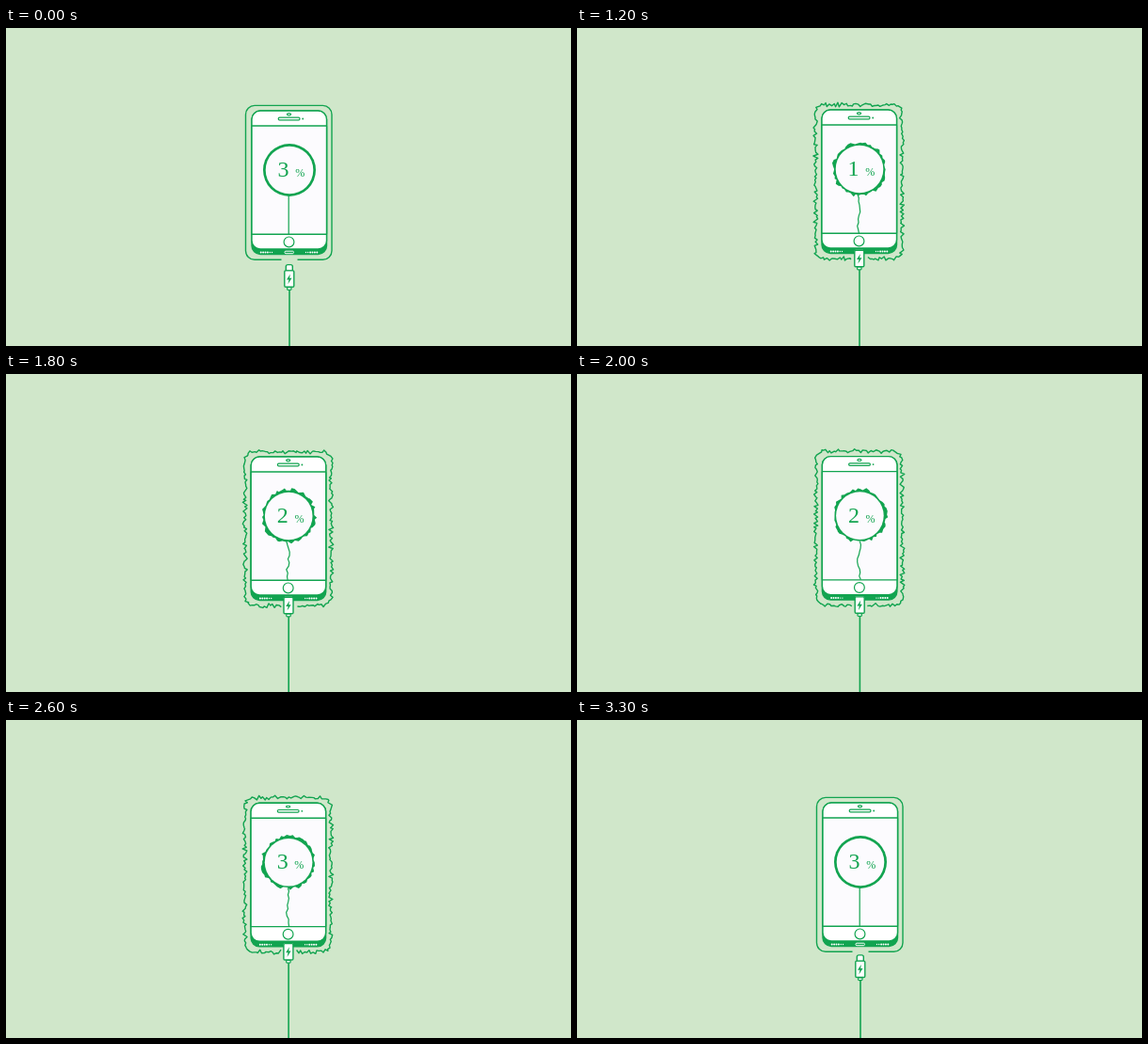
An HTML page for the animation above (3.4 s loop, 600x338 px).

```html
<!DOCTYPE html>
<html lang="en">
<head>
<meta charset="utf-8">
<title>Charging phone</title>
<style>
  html, body { margin: 0; width: 100%; height: 100%; overflow: hidden; background: #d0e7ca; }
  svg { display: block; width: 100vw; height: 100vh; }
  text { font-family: "Liberation Serif", "Times New Roman", serif; fill: #12a450; }
  .line { stroke: #12a450; stroke-width: 1.4; stroke-linejoin: round; }
  .ink { fill: #12a450; }
  .white { fill: #fff; }
  .screen { fill: #fcfbfe; }
</style>
</head>
<body>
<svg viewBox="0 0 600 338">
  <defs>
    <clipPath id="belowPort"><rect x="280" y="239.5" width="40" height="60"/></clipPath>
  </defs>
  <g id="stage">
    <path id="casing" class="line" fill="none" stroke-width="1.5"
      d="M309.5 246.3H336.5A9.5 9.5 0 0 0 346 236.8V91.9A9.5 9.5 0 0 0 336.5 82.4H264A9.5 9.5 0 0 0 254.5 91.9V236.8A9.5 9.5 0 0 0 264 246.3H292.5"/>

    <rect class="line ink" x="261" y="88" width="79.5" height="152.5" rx="9"/>
    <rect class="line white" x="261" y="88" width="79.5" height="147" rx="9"/>
    <rect class="line screen" x="261" y="104" width="79.5" height="115.3" stroke-width="1.2"/>
    <ellipse class="line white" cx="300.5" cy="91.8" rx="2.1" ry="1.1" style="stroke-width:1.2"/>
    <rect class="line white" x="289.2" y="95.2" width="22.8" height="2.6" rx="1.3" style="stroke-width:1.2"/>
    <circle class="ink" cx="315.2" cy="96.5" r=".9"/>
    <circle class="line white" cx="300.5" cy="227.4" r="5.4" style="stroke-width:1.2"/>
    <rect x="296" y="237.2" width="9.4" height="2.5" rx="1" fill="none" stroke="#fff"/>
    <g id="grille" class="white"></g>

    <path id="stem" class="line" fill="none" style="stroke-width:1.2"/>
    <path id="ring" class="ink"/>
    <circle class="screen" cx="301" cy="151" r="25.3"/>
    <text id="digit" x="288.6" y="158.2" font-size="24"></text>
    <text x="307.2" y="158" font-size="12">%</text>

    <g clip-path="url(#belowPort)">
      <path id="tip" class="line white" d="M297.3 258.5V254a2 2 0 0 1 2 -2h3a2 2 0 0 1 2 2V258.5Z"/>
    </g>
    <g id="plug">
      <path class="line" d="M301 279V365" style="stroke-width:1.6"/>
      <rect class="line white" x="298.6" y="276" width="4.4" height="2.8" rx=".8" style="stroke-width:1.2"/>
      <rect class="line white" x="295.8" y="258.3" width="10" height="17.4" rx="1.2"/>
      <path class="ink" d="M301.9 262L298 268H300.4L299.4 272.6L303.5 266.2H301.1Z"/>
    </g>
  </g>
</svg>
<script>
const LOOP = 3400, STEP = 100, TRAVEL = 21;
const SHAKE_FROM = 1100, SHAKE_TO = 3000;
const shakeX = [.5, -1, .6, -.5, 1, -.4, .3, -.8, .6, -.6, .9, -.3, .8, -.7, .4, -.9, .5, 0, -.5, 0];
const shakeY = [0, -1, .4, -.5, .3, 0, -.6, 0, .5, -.4, .2, -.5, 0, .4, -.6, .3, 0, 0, .3, 0];

const el = id => document.getElementById(id);
const [stage, casing, grille, stem, ring, digit, tip, plug] =
  ['stage', 'casing', 'grille', 'stem', 'ring', 'digit', 'tip', 'plug'].map(el);

const noise = (i, seed) => {
  const v = Math.sin(i * 127.1 + seed * 311.7) * 43758.5453;
  return v - Math.floor(v);
};
const toPath = points => 'M' + points.map(p => p.map(v => v.toFixed(2)).join(' ')).join('L');

const smoothCasing = casing.getAttribute('d');
const casingLength = casing.getTotalLength();
const casingPoints = Array.from({ length: 221 }, (_, i) => {
  const p = casing.getPointAtLength(casingLength * i / 220);
  return [p.x, p.y];
});

// Speaker holes mirror each other around the port.
for (const side of [-1, 1]) {
  [18, 20.2, 22.6, 25, 27.4, 29.8].forEach((d, i) => {
    const hole = document.createElementNS('http://www.w3.org/2000/svg', 'circle');
    hole.setAttribute('cx', 300.5 + side * d);
    hole.setAttribute('cy', 238.5);
    hole.setAttribute('r', i < 2 ? .7 : 1);
    grille.append(hole);
  });
}

function roughCasing(seed) {
  return toPath(casingPoints.map(([x, y], i) => {
    const away = (i % 2 ? 1 : -1) * .6 + (noise(i, seed) - .5) * 3.8;
    const along = (noise(i + 500, seed) - .5) * 1.6;
    const onSide = x < 259 || x > 341;
    return onSide ? [x + away, y + along] : [x + along, y + away];
  }));
}

function roughRing(seed) {
  const count = 64;
  return toPath(Array.from({ length: count }, (_, i) => {
    const a = (i + noise(i, seed) * .7) / count * 2 * Math.PI;
    const r = 26.7 + noise(i + 900, seed) ** 1.5 * 3.4;
    return [301 + r * Math.cos(a), 151 + r * Math.sin(a)];
  })) + 'Z';
}

function roughStem(seed) {
  return toPath(Array.from({ length: 12 }, (_, i) => [
    300.2 + Math.sin(i * .6 + seed) * .9 + (noise(i + 1300, seed) - .5) * 2.2,
    178 + i * 41 / 11
  ]));
}

function plugLift(t) {
  if (t < 100) return .4;
  if (t < SHAKE_FROM) return TRAVEL * ((t - 100) / 1000) ** 3;
  if (t <= SHAKE_TO) return TRAVEL;
  return TRAVEL * (1 - (t - SHAKE_TO) / 500) ** 2.5;
}

function percent(t) {
  if (t < 100 || t >= 2400) return 3;
  return t < 1700 ? 1 : 2;
}

function render(time) {
  const frame = Math.floor((time % LOOP) / STEP), t = frame * STEP;
  const shaking = t >= SHAKE_FROM && t <= SHAKE_TO;
  const k = frame - SHAKE_FROM / STEP;
  stage.setAttribute('transform', shaking ? `translate(${shakeX[k]} ${shakeY[k]})` : '');
  casing.setAttribute('d', shaking ? roughCasing(frame) : smoothCasing);
  ring.setAttribute('d', shaking ? roughRing(frame) : 'M273 151a28 28 0 1 1 56 0a28 28 0 1 1 -56 0Z');
  stem.setAttribute('d', shaking ? roughStem(frame) : 'M300.2 178V219');
  digit.textContent = percent(t);
  const lift = `translate(0 ${-plugLift(t)})`;
  plug.setAttribute('transform', lift);
  tip.setAttribute('transform', lift);
}

const start = performance.now();
function tick() {
  render(performance.now() - start);
  requestAnimationFrame(tick);
}
tick();
</script>
</body>
</html>
```
